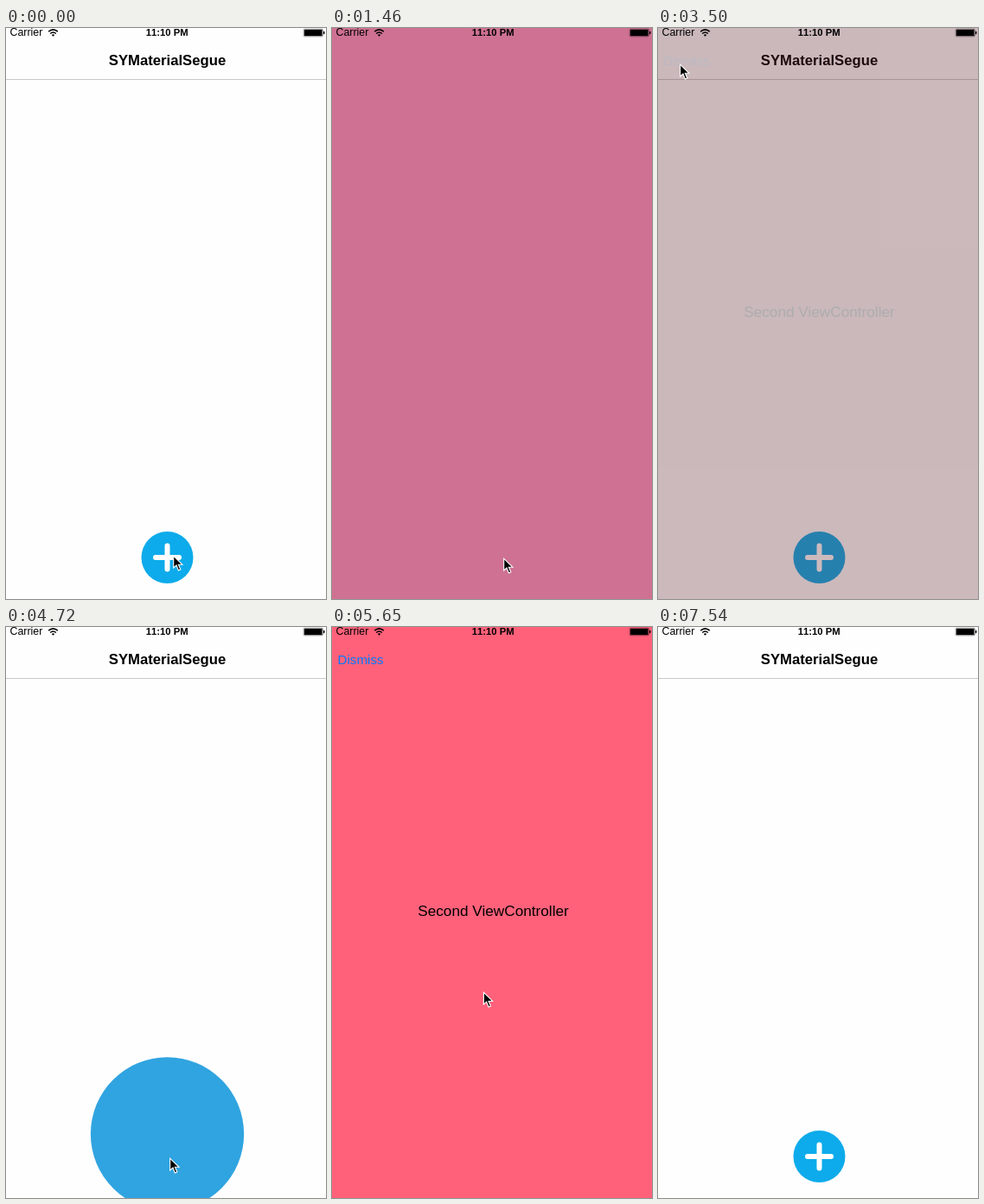
These frames come from a looping animation (370x660 px, 8.2 s). An HTML page:

```html
<!DOCTYPE html>
<html lang="en">
<head>
<meta charset="utf-8">
<title>Material segue</title>
<style>
  html, body { margin: 0; width: 100%; height: 100%; overflow: hidden; background: #000; }
  svg { display: block; width: 370px; height: 660px; }
  text { font-family: "Liberation Sans", Arial, sans-serif; }
  .middle { text-anchor: middle; }
  .bold { font-weight: bold; font-kerning: none; }
</style>
</head>
<body>
<svg viewBox="0 0 370 660">
  <g id="first">
    <rect width="370" height="660" fill="#fefefe"/>
    <rect y="59" width="370" height="1" fill="#c8c8c8"/>
    <text class="middle bold" x="186.5" y="43" font-size="16.7">SYMaterialSegue</text>
    <g id="button">
      <circle cx="186.5" cy="612" r="30" fill="#0dabeb"/>
      <path d="M173 612H200M186.5 598.5V625.5" stroke="#fff" stroke-width="6" stroke-linecap="round"/>
    </g>
  </g>
  <circle id="ripple" cx="186.5"/>
  <g id="second">
    <rect width="370" height="660" fill="#ff617a"/>
    <text id="dismiss" x="6.5" y="43" font-size="15.2" fill="#007aff">Dismiss</text>
    <text class="middle" x="186.5" y="334" font-size="17.2">Second ViewController</text>
  </g>
  <g id="status">
    <text x="4.5" y="9.4" font-size="12.4">Carrier</text>
    <text class="middle bold" x="186.2" y="9.3" font-size="11.3">11:10 PM</text>
    <g fill="none" stroke="#000" stroke-width="1.6">
      <path d="M49.2 4.2Q54.5 -.6 59.8 4.2M51.2 6.5Q54.5 3.5 57.8 6.5"/>
      <path d="M52.8 7.9Q54.5 6.6 56.2 7.9L54.5 9.8z" fill="#000" stroke="none"/>
    </g>
    <rect x="344.25" y="1.25" width="22" height="8.5" rx="1.2" fill="none" stroke="#000" stroke-width=".5"/>
    <rect x="345" y="2" width="20.5" height="7" rx=".6"/>
    <rect x="367" y="3.8" width="1.4" height="3.4" rx=".7"/>
  </g>
  <path id="cursor" d="M.7 1.2V15L4 12 6.400 18 8.800 17 6.400 11.300H11z" stroke="#fff" stroke-width="1.1"/>
</svg>
<script>
const LOOP = 8200;
const BLUE = [26, 171, 235], PINK = [255, 97, 122];

// Start times of each round trip between the views.
const trips = [
  { expand: 1122, tapDismiss: 3130, fade: 3440 },
  { expand: 4612, tapDismiss: 6430, fade: 6620 }
];

// The pointer rests between moves; each move glides to a new point.
const home = { x: 193, y: 609 };
const moves = [
  { start: 40, time: 80, x: 226, y: 592 },
  { start: 280, time: 370, x: 201, y: 609 },
  { start: 1160, time: 300, x: 198, y: 612 },
  { start: 2250, time: 850, x: 26, y: 50 },
  { start: 3430, time: 70, x: 25, y: 41 },
  { start: 3500, time: 750, x: 189, y: 613 },
  { start: 5200, time: 270, x: 189, y: 617 },
  { start: 5540, time: 500, x: 46, y: 25 },
  { start: 6060, time: 330, x: 36, y: 31 },
  { start: 6620, time: 860, x: 314, y: 656 },
  { start: 7480, time: 60, x: 330, y: 690 }
];

const get = id => document.getElementById(id);
const [first, button, ripple, second, dismiss, cursor] =
  ["first", "button", "ripple", "second", "dismiss", "cursor"].map(get);

const mix = (a, b, p) => a + (b - a) * p;
const progress = (t, start, time) => Math.min(1, Math.max(0, (t - start) / time));
const easeOut = u => 1 - (1 - u) ** 1.6;
const easeInOut = u => {
  const a = u ** 1.75, b = (1 - u) ** 1.75;
  return a / (a + b);
};

function pointerAt(t) {
  let { x, y } = home;
  for (const move of moves) {
    const u = progress(t, move.start, move.time);
    // Upward flicks start fast and bend sideways later.
    const easeY = move.y < y ? easeOut : easeInOut;
    x = mix(x, move.x, easeInOut(u));
    y = mix(y, move.y, easeY(u));
    if (u < 1) break;
  }
  return [x, y];
}

function render(t) {
  const trip = trips[t < 4250 ? 0 : 1];
  const fading = t >= trip.fade;

  // Both views cross-fade over black on the way back.
  first.style.opacity = fading ? mix(0.67, 1, progress(t, trip.fade, 200)) : 1;
  second.style.opacity = fading
    ? mix(0.275, 0, progress(t, trip.fade, 105))
    : progress(t, trip.expand + 500, 250);
  button.style.opacity = fading ? 1 : mix(1, 0.2, progress(t, trip.expand - 332, 200));
  dismiss.style.opacity = mix(1, 0.5, progress(t, trip.tapDismiss, 120));

  const p = easeInOut(progress(t, trip.expand, 500));
  ripple.style.display = t > trip.expand + 45 && !fading ? "" : "none";
  ripple.setAttribute("cy", mix(612, 343, p));
  ripple.setAttribute("r", mix(30, 637, p));
  ripple.setAttribute("fill", `rgb(${BLUE.map((c, i) => Math.round(mix(c, PINK[i], p)))})`);

  cursor.setAttribute("transform", `translate(${pointerAt(t)})`);
}

function tick() {
  render(performance.now() % LOOP);
  requestAnimationFrame(tick);
}
tick();
</script>
</body>
</html>
```
